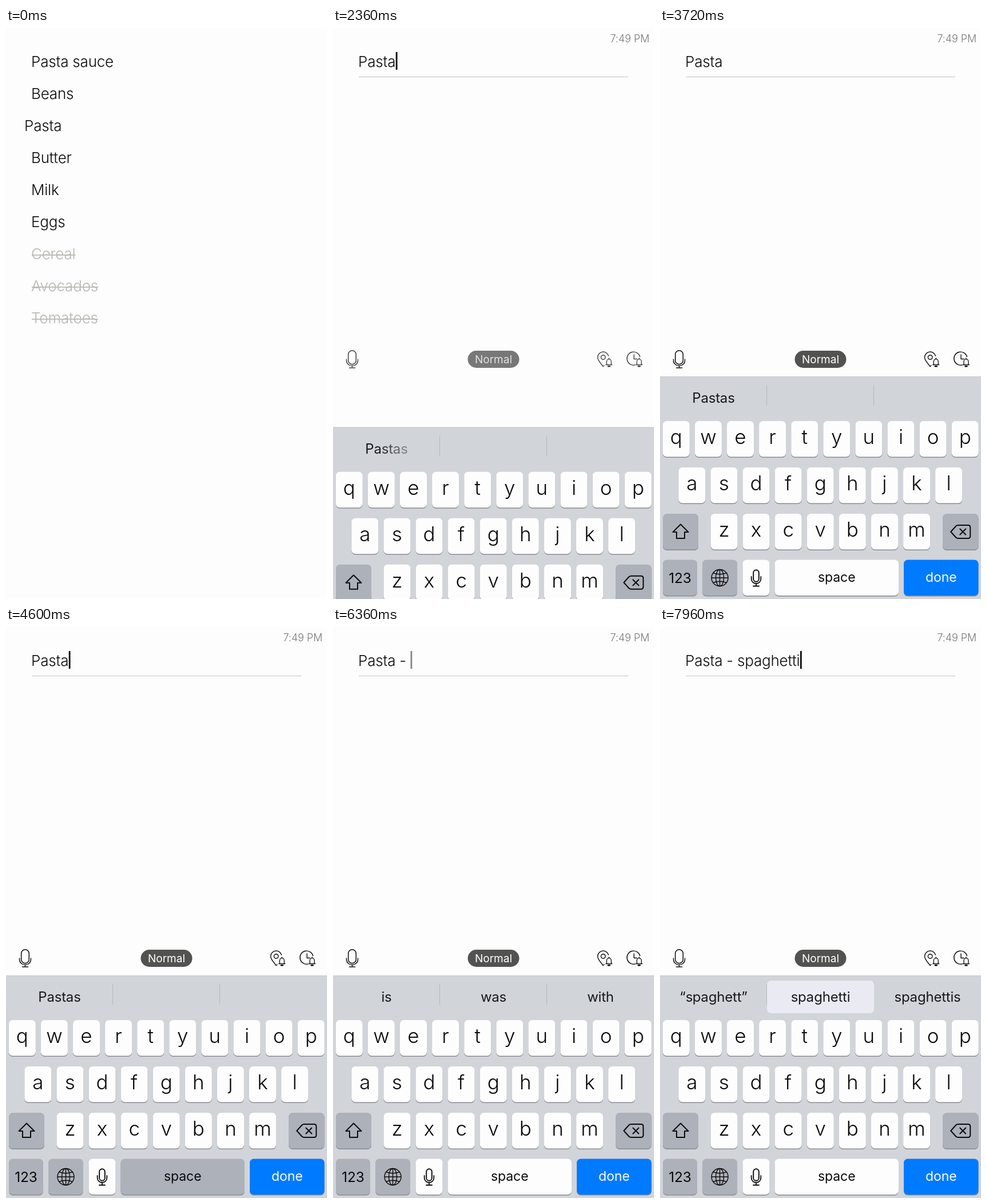
Animation of 561x998 px, one loop 8 s. Source, as an HTML page with a canvas:

```html
<!DOCTYPE html>
<html lang="en">
<head>
<meta charset="utf-8">
<title>Shopping list</title>
<style>
html, body { margin: 0; width: 100%; height: 100%; overflow: hidden; background: #fdfdfe; }
canvas { display: block; width: 561px; height: 998px; }
</style>
</head>
<body>
<canvas id="stage"></canvas>
<script>
const W = 561, H = 998, LOOP = 8000;
const canvas = document.getElementById('stage');
const ctx = canvas.getContext('2d');
const dpr = window.devicePixelRatio || 1;
canvas.width = Math.round(W * dpr);
canvas.height = Math.round(H * dpr);

const PAPER = '#fdfdfe', INK = '#0b0b0c', BOARD = '#d1d4d9', GREY_KEY = '#adb1ba', BLUE = '#007aff';
const clamp = v => Math.max(0, Math.min(1, v));
const ramp = (t, a, b) => clamp((t - a) / (b - a));
const smooth = v => v * v * (3 - 2 * v);

const OPEN = 2200;
const todo = ['Pasta sauce', 'Beans', 'Pasta', 'Butter', 'Milk', 'Eggs'];
const done = ['Cereal', 'Avocados', 'Tomatoes'];

// Key presses: label, touch down, touch up, inserted text
const presses = [
  ['space', 4600, 4700, ' '],
  ['123', 5000, 5080, ''],
  ['-', 5380, 5480, '-'],
  ['space', 5680, 5780, ' ']
];
[...'spaghetti'].forEach((c, i) => {
  const down = [6440, 6600, 6760, 6960, 7140, 7260, 7430, 7590, 7780][i];
  presses.push([c, down, down + 100, c]);
});
const NUM_FROM = 5040, NUM_TO = 5830;

// Suggestions: start time, three words, middle one highlighted
const hints = [
  [2262, ['Pastas', '', '']],
  [4840, ['is', 'was', 'with']],
  [6690, ['“s”', 'so', 'some']],
  [6850, ['“sp”', 'spa', 'sports']],
  [7010, ['“spa”', 'spa', 'space']],
  [7224, ['“spag”', 'spag', 'spadina'], true],
  [7390, ['“spagh”', 'spaghetti', 'spaghettis'], true],
  [7510, ['“spaghe”', 'spaghetti', 'spaghettis'], true],
  [7680, ['“spaghet”', 'spaghetti', 'spaghettis'], true],
  [7820, ['“spaghett”', 'spaghetti', 'spaghettis'], true]
];

function font(size, weight = 400, spacing = 0) {
  ctx.font = `${weight} ${size}px Inter, "Open Sans", sans-serif`;
  ctx.letterSpacing = spacing + 'px';
}
function text(s, x, y, color = INK, align = 'left') {
  ctx.fillStyle = color;
  ctx.textAlign = align;
  ctx.fillText(s, x, y);
}
function box(x, y, w, h, r, color) {
  ctx.beginPath();
  ctx.roundRect(x, y, w, h, r);
  ctx.fillStyle = color;
  ctx.fill();
}
function line(d, width = 1.5, color = INK) {
  ctx.strokeStyle = color;
  ctx.lineWidth = width;
  ctx.stroke(new Path2D(d));
}
function faded(alpha, draw) {
  ctx.save();
  ctx.globalAlpha *= alpha;
  draw();
  ctx.restore();
}
function at(x, y, draw) {
  ctx.save();
  ctx.translate(x, y);
  draw();
  ctx.restore();
}

function drawList(t) {
  const swipe = smooth(ramp(t, 40, 640));
  const dim = 1 - 0.55 * swipe - 0.1 * ramp(t, 920, 1040);
  font(26, 300, -0.2);
  todo.forEach((s, i) => {
    const active = s === 'Pasta';
    faded(active ? 1 : dim, () => text(s, active ? 32 - 110 * swipe : 44, 68 + 56 * i));
  });
  faded(dim, () => done.forEach((s, i) => {
    const y = 68 + 56 * (todo.length + i);
    text(s, 44, y, '#b7b8b1');
    ctx.fillRect(45, y - 8, ctx.measureText(s).width - 1, 1.7);
  }));
}

function typed(t) {
  return 'Pasta' + presses.filter(p => p[2] <= t).map(p => p[3]).join('');
}
function caretAlpha(t) {
  let ref = 2740;
  for (const [, down, up, s] of presses) {
    if (s && down <= t) ref = up <= t ? up : down;
  }
  const dt = Math.max(0, t - ref), p = dt % 1000;
  if (p >= 500) return 1 - ramp(p, 500, 660);
  return dt < 1000 ? 1 : ramp(p, 0, 200);
}
function drawField(t) {
  font(18, 300, -0.1);
  text('7:49 PM', 553, 24.5, '#77777a', 'right');
  font(26, 300, -0.2);
  const s = typed(t);
  text(s, 44, 68);
  const end = 44.5 + ctx.measureText(s).width;
  faded(caretAlpha(t), () => {
    ctx.fillStyle = INK;
    ctx.fillRect(end, 42, 2.8, 31);
  });
  ctx.fillStyle = '#c2c2c4';
  ctx.fillRect(45, 85, 471, 1);
}

function bell(x, y) {
  at(x, y, () => {
    line('M-5.5 4.5 H5.5 M-4 4.5 V-1 A4 4.5 0 0 1 4 -1 V4.5 M0 -5.5 V-7', 1.3);
    box(-2.7, 6, 5.4, 2.4, 1, INK);
  });
}
function drawTools() {
  at(33.5, 579, () => {
    line('M-6.8 -8.5 A6.8 6.8 0 0 1 6.8 -8.5 V2 A6.8 6.8 0 0 1 -6.8 2 Z');
    line('M-10 0 V2 A10 9.5 0 0 0 10 2 V0 M0 11.5 V15 M-5 15 H5', 1.4);
  });
  box(235.5, 564, 90, 30, 15, '#525251');
  font(19, 400, 0);
  text('Normal', 280.5, 586, '#fff', 'center');
  line('M474 590 L472 591.5 C468 586 462.5 581 462.5 575.5 A9.7 9.7 0 0 1 481.5 573', 1.4);
  line('M468.4 575.5 a3.8 3.8 0 1 0 7.6 0 a3.8 3.8 0 1 0 -7.6 0', 1.4);
  bell(482.3, 584);
  line('M528 589 A11.6 11.6 0 1 1 536.5 574.5', 1.4);
  line('M526 571 V578.5 H531', 1.4);
  bell(535, 584);
}

const icons = {
  shift() {
    line('M0 -13 L13.5 0.5 H7 V11.5 H-7 V0.5 H-13.5 Z', 2);
  },
  del() {
    line('M-17 0 L-8 -10 Q-6.5 -11.5 -4 -11.5 H13 Q17 -11.5 17 -7.5 V7.5 Q17 11.5 13 11.5 H-4 Q-6.5 11.5 -8 10 Z', 2);
    line('M-1 -5 L9 5 M9 -5 L-1 5', 2);
  },
  globe() {
    line('M-14.5 0 a14.5 14.5 0 1 0 29 0 a14.5 14.5 0 1 0 -29 0 M-14.5 0 H14.5 M0 -14.5 V14.5', 1.4);
    line('M-7 0 a7 14.5 0 1 0 14 0 a7 14.5 0 1 0 -14 0', 1.4);
    line('M-11.5 -8.5 Q0 -4 11.5 -8.5 M-11.5 8.5 Q0 4 11.5 8.5', 1.4);
  },
  mic() {
    line('M-4.8 -9 A4.8 4.8 0 0 1 4.8 -9 V2 A4.8 4.8 0 0 1 -4.8 2 Z', 1.9);
    line('M-8.3 -2 V2 A8.3 8 0 0 0 8.3 2 V-2 M0 10 V14.5 M-5 14.5 H5', 1.8);
  }
};

function row(chars, x, y, w = 47, step = 56.1) {
  return [...chars].map((c, i) => ({ label: c, x: x + i * step, y, w, big: true }));
}
function layout(numeric) {
  const keys = numeric
    ? [...row('1234567890', 4.8, 687), ...row('-/:;()$&@"', 4.8, 768), ...row(".,?!'", 88.5, 849, 69.6, 78.8),
       { label: '#+=', x: 5, y: 849, w: 62, grey: true }]
    : [...row('qwertyuiop', 4.8, 687), ...row('asdfghjkl', 32.3, 768), ...row('zxcvbnm', 88.5, 849),
       { icon: 'shift', x: 5, y: 849, w: 62, grey: true }];
  return keys.concat([
    { icon: 'del', x: 494, y: 849, w: 62.5, grey: true },
    { label: numeric ? 'ABC' : '123', x: 5, y: 929.5, w: 60, grey: true },
    { icon: 'globe', x: 74, y: 929.5, w: 61, grey: true },
    { icon: 'mic', x: 144.5, y: 929.5, w: 47 },
    { label: 'space', x: 200.5, y: 929.5, w: 216.5 },
    { label: 'done', x: 426, y: 929.5, w: 130.5, blue: true }
  ]);
}
const letters = layout(false), digits = layout(true);

function drawKey(k, pressed) {
  let fill = k.blue ? BLUE : k.grey ? GREY_KEY : PAPER;
  if (pressed && !k.big) fill = k.grey ? PAPER : GREY_KEY;
  box(k.x, k.y + 1.5, k.w, 62.5, 7, '#888b91');
  box(k.x, k.y, k.w, 62.5, 7, fill);
  const cx = k.x + k.w / 2;
  if (k.icon) return at(cx, k.y + 31.5, icons[k.icon]);
  if (k.big) font(35, 350);
  else font(k.grey ? 24.5 : 23, 400, -0.1);
  text(k.label, cx, k.y + (k.big || k.grey ? 40 : 38.5), k.blue ? '#fff' : INK, 'center');
}

function drawPopup(k) {
  const top = k.y - 97, low = k.y + 62.5;
  const l = Math.max(4, Math.min(k.x - 20, W - 4 - 87)), r = l + 87;
  const x1 = k.x, x2 = k.x + k.w;
  ctx.save();
  ctx.shadowColor = 'rgba(0,0,0,.35)';
  ctx.shadowBlur = 9 * dpr;
  ctx.shadowOffsetY = dpr;
  ctx.fillStyle = PAPER;
  ctx.beginPath();
  ctx.moveTo(l + 13, top);
  ctx.arcTo(r, top, r, top + 13, 13);
  ctx.lineTo(r, top + 59);
  ctx.bezierCurveTo(r, top + 80, x2, top + 76, x2, top + 98);
  ctx.arcTo(x2, low, x2 - 7, low, 7);
  ctx.arcTo(x1, low, x1, low - 7, 7);
  ctx.lineTo(x1, top + 98);
  ctx.bezierCurveTo(x1, top + 76, l, top + 80, l, top + 59);
  ctx.arcTo(l, top, l + 13, top, 13);
  ctx.fill();
  ctx.restore();
  font(58, 350);
  text(k.label, (l + r) / 2, top + 63, INK, 'center');
}

function drawHints(t) {
  let n = -1;
  while (n + 1 < hints.length && hints[n + 1][0] <= t) n++;
  if (n < 0) return;
  const [start, words, strong] = hints[n];
  if (strong) {
    const grow = hints[n - 1][2] ? 1 : ramp(t, start - 20, start + 60);
    faded(grow, () => box(187, 618, 187, 57, 7, '#eaebf2'));
  }
  font(24, 400, -0.2);
  words.forEach((word, slot) => {
    const before = n ? hints[n - 1][1][slot] : '';
    let same = 0;
    while (same < word.length && word[same] === before[same]) same++;
    const x = 93.5 + 187 * slot - ctx.measureText(word).width / 2;
    [...word].forEach((c, i) => {
      const a = i < same ? 1 : clamp((t - start - 12 * (i - same)) / 90);
      faded(a, () => text(c, x + ctx.measureText(word.slice(0, i)).width, 655, '#17181c'));
    });
  });
}

function drawBoard(t) {
  ctx.fillStyle = BOARD;
  ctx.fillRect(0, 609, W, H - 609);
  ctx.fillStyle = '#c3c6cc';
  ctx.fillRect(0, 609, W, 1);
  ctx.fillStyle = '#b5b9c0';
  for (const x of [186, 373]) ctx.fillRect(x, 624, 1, 36);
  drawHints(t);
  const keys = t >= NUM_FROM && t < NUM_TO ? digits : letters;
  const held = presses.filter(p => t >= p[1] && t < p[2] + 50).map(p => p[0]);
  keys.forEach(k => drawKey(k, held.includes(k.label)));
  keys.filter(k => k.big && held.includes(k.label)).forEach(drawPopup);
}

function draw(t) {
  ctx.setTransform(dpr, 0, 0, dpr, 0, 0);
  ctx.fillStyle = PAPER;
  ctx.fillRect(0, 0, W, H);
  ctx.lineCap = ctx.lineJoin = 'round';
  if (t < OPEN + 120) faded(1 - ramp(t, OPEN, OPEN + 120), () => drawList(t));
  if (t < OPEN) return;
  // Critically damped rise of the keyboard
  const w = 0.0175 * (t - OPEN);
  const left = (1 + w) * Math.exp(-w);
  faded(ramp(t, OPEN, OPEN + 140), () => drawField(t));
  faded(1 - left, drawTools);
  at(0, left < 0.003 ? 0 : 389 * left, () => drawBoard(t));
}

const began = performance.now();
function tick() {
  draw((performance.now() - began) % LOOP);
  requestAnimationFrame(tick);
}
tick();
</script>
</body>
</html>
```
